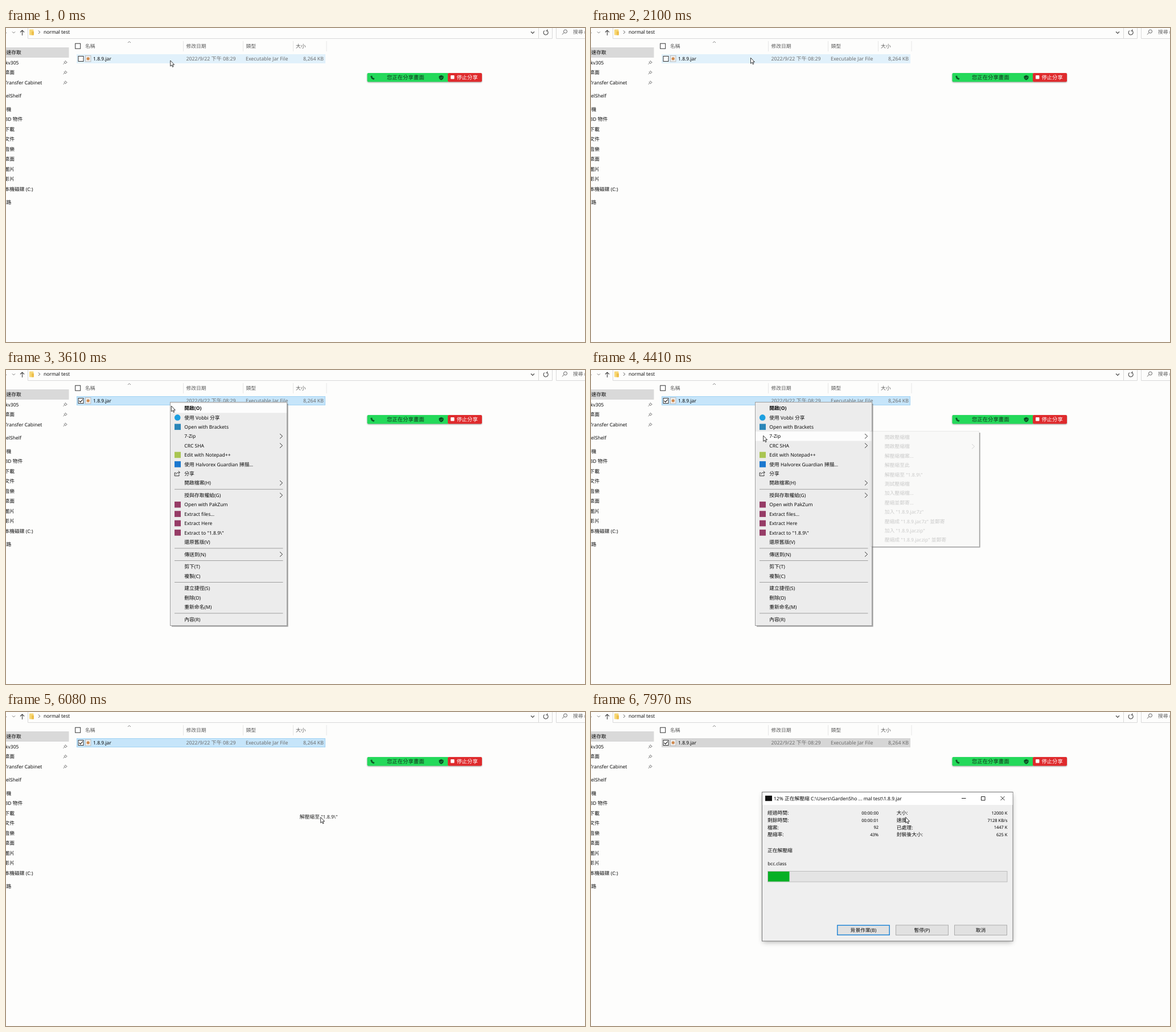
Recreate the animation shown at these times as an HTML page. Size 1017x551 px, loop 8000 ms.

```html
<!DOCTYPE html>
<html lang="zh-Hant">
<head>
<meta charset="utf-8">
<title>Extracting a jar</title>
<style>
html, body { margin: 0; width: 100%; height: 100%; overflow: hidden; background: #fdfdfc; }
svg { display: block; width: 1017px; height: 551px; }
text { font-family: "Noto Sans", "Noto Sans CJK TC", "Noto Sans CJK", sans-serif; text-rendering: geometricPrecision; white-space: pre; }
</style>
</head>
<body>
<svg id="stage" viewBox="0 0 1017 551"></svg>
<script>
const LOOP = 8000;
const CJK = /([\u3000-\u9fff]+)/;
const STEP = 16.4;

// Drawing helpers. y is the middle of the text line.
function text(x, y, s, { fill = '#0c0c0c', size = 8.5, anchor = 'start', weight = 400 } = {}) {
  const runs = s.split(CJK).map((part, i) =>
    i % 2 ? `<tspan font-size="${size * 1.035}">${part}</tspan>` : part).join('');
  return `<text x="${x}" y="${y + 3.1}" font-size="${size}" fill="${fill}" text-anchor="${anchor}" font-weight="${weight}">${runs}</text>`;
}
const rect = (x, y, w, h, fill, more = '') =>
  `<rect x="${x}" y="${y}" width="${w}" height="${h}" fill="${fill}" ${more}/>`;
const line = (d, color = '#444', width = 1, more = '') =>
  `<path d="${d}" fill="none" stroke="${color}" stroke-width="${width}" ${more}/>`;
const group = (id, body, more = '') => `<g id="${id}" ${more}>${body}</g>`;
const dot = (x, y, r, fill) => `<circle cx="${x}" cy="${y}" r="${r}" fill="${fill}"/>`;
const checkbox = (x, y) => rect(x, y, 9, 9, '#fff', 'stroke="#333"');

function toolbar() {
  return line('M38.5 0V18.5H959.5V0M935.5 0V18M1017 18.5H966.5V0', '#d9d9d9') +
    line('M11 6.5L13.5 9L16 6.5M0 8.5H1', '#777') +
    line('M28.5 13V4M25 7.5L28.5 4L32 7.5', '#444', 1.1) +
    rect(41, 2.5, 7.5, 10, '#f7d774', 'rx="1"') + rect(45, 6, 4, 6.5, '#edbf4c') +
    line('M57 4.5L59.7 7.3L57 10', '#555') +
    text(66, 7.2, 'normal test') +
    line('M922 6.5L925 9.5L928 6.5', '#444', 1.1) +
    line('M950.5 4.7A4 4 0 1 1 946 4.6M950.8 2.5V5H948', '#444', 1.1) +
    line('M980.3 8.2L976.8 11.5', '#666') +
    '<circle cx="982.5" cy="6" r="3" fill="none" stroke="#666"/>' +
    text(996, 7.2, '搜尋 normal test', { fill: '#666' });
}

function sidebar() {
  const items = [
    [0.5, 43, '速存取'], [-1, 60.5, 'kv305'], [-2.6, 78, '桌面'], [-2.5, 95.8, 'Transfer Cabinet'],
    [0, 119, 'elShelf'], [0.5, 142.5, '機'], [-1.5, 160, '3D 物件'], [-2.6, 177.5, '下載'],
    [-2.6, 195, '文件'], [-2.6, 212.5, '音樂'], [-2.6, 230, '桌面'], [-2.6, 247.5, '圖片'],
    [-2.6, 265, '影片'], [-2.6, 282.8, '本機磁碟 (C:)'], [0.5, 306, '路']
  ];
  const pins = [60.5, 78, 95.8].map(y =>
    line(`M104 ${y - 3.2}L107.4 ${y + .2}M104.8 ${y - 2.4}L102.4 ${y - .5}M106.7 ${y - .5}L104.7 ${y + 2}M101.6 ${y - 1}L105 ${y + 2.4}M103 ${y + .8}L100.7 ${y + 3.2}`, '#777')).join('');
  return rect(0, 34, 110.5, 18, '#d9d9d9') + items.map(i => text(...i)).join('') + pins;
}

function header() {
  const gray = { fill: '#5c5c5c' };
  return [311.5, 416.5, 504.5, 563].map(x => line(`M${x} 23V41`, '#e6e6e6')).join('') +
    checkbox(121.7, 27.2) +
    line('M214 26L216.5 23.6L219 26', '#777', .9) +
    text(139, 31.8, '名稱', gray) + text(316.5, 31.8, '修改日期', gray) +
    text(421.5, 31.8, '類型', gray) + text(509, 31.8, '大小', gray);
}

function fileRow() {
  const gray = { fill: '#6d6d6d', size: 8.8 };
  return rect(124.5, 46.5, 436, 15, 'none', 'id="rowBg"') +
    group('tickBox', checkbox(127, 49.5)) +
    line('M128.6 54L130.8 56.3L134.6 51.6', '#222', 1.1, 'id="tick"') +
    rect(139.5, 48.5, 9.5, 10.5, '#eee', 'stroke="#aaa" stroke-width=".7"') + dot(144.2, 53.8, 2.6, '#d08a4e') +
    text(153, 53.6, '1.8.9.jar') +
    text(316.5, 53.6, '2022/9/22 下午 08:29', gray) +
    text(421, 53.6, 'Executable Jar File', gray) +
    text(558, 53.6, '8,264 KB', { ...gray, anchor: 'end' });
}

function shareBar() {
  return `<g filter="url(#soft)" opacity=".6">${rect(634.5, 80, 201.5, 15.5, '#666', 'rx="2"')}</g>` +
    rect(634.5, 79, 143, 15.5, '#24d95a', 'rx="2"') + rect(776, 79, 60, 15.5, '#df2a2c', 'rx="2"') +
    `<path d="M640 84.5L643 83.5L644 87L647.5 88.5L646 91L642 89Z" fill="#0c5a26"/>` +
    `<path d="M764.5 82.8L768.5 84.5V87.5Q768 90 764.5 91.5Q761 90 760.5 87.5V84.5Z" fill="#0c4a22"/>` +
    line('M762.6 87L764.2 88.7L766.8 85.6', '#24d95a', .9) +
    text(669, 86.6, '您正在分享畫面', { size: 9.05, fill: '#10301a' }) +
    rect(781, 83, 6.5, 6.5, '#fff', 'rx="1"') +
    text(791.5, 86.4, '停止分享', { size: 9, fill: '#fff' });
}

// label, separator before, submenu arrow, icon
const MENU = [
  ['開啟(O)'], ['使用 Vobbi 分享', 0, 0, 'call'], ['Open with Brackets', 0, 0, '#2a86b8'], ['7-Zip', 0, 1],
  ['CRC SHA', 0, 1], ['Edit with Notepad++', 0, 0, '#a9c552'], ['使用 Halvorex Guardian 掃描...', 0, 0, '#1b78cf'],
  ['分享', 0, 0, 'share'], ['開啟檔案(H)', 0, 1], ['授與存取權給(G)', 1, 1],
  ['Open with PakZum', 0, 0, '#963c66'], ['Extract files...', 0, 0, '#963c66'], ['Extract Here', 0, 0, '#963c66'],
  ['Extract to "1.8.9\\"', 0, 0, '#963c66'], ['還原舊版(V)'], ['傳送到(N)', 1, 1], ['剪下(T)', 1], ['複製(C)'],
  ['建立捷徑(S)', 1], ['刪除(D)'], ['重新命名(M)'], ['內容(R)', 1]
];
let nextY = 67 - STEP;
const menuY = MENU.map(([, sep]) => nextY += STEP + (sep ? 5.2 : 0));

const SUB = ['開啟壓縮檔', '開啟壓縮檔', '解壓縮檔案...', '解壓縮至此', '解壓縮至 "1.8.9\\"', '測試壓縮檔',
  '加入壓縮檔...', '壓縮並郵寄...', '加入 "1.8.9.jar.7z"', '壓縮成 "1.8.9.jar.7z" 並郵寄',
  '加入 "1.8.9.jar.zip"', '壓縮成 "1.8.9.jar.zip" 並郵寄'];
const subY = SUB.map((_, i) => 117.8 + i * STEP);

function icon(kind, y) {
  if (!kind) return '';
  if (kind === 'call') return dot(301.2, y, 5.3, '#1c9fe0');
  if (kind === 'share')
    return line(`M298.5 ${y - 1.5}H296.2V${y + 4}H304V${y + 1.5}M298.5 ${y + 1.5}Q299 ${y - 2} 305 ${y - 2}M302.8 ${y - 4.5}L305.5 ${y - 2}L302.8 ${y + .5}`, '#333');
  return rect(296, y - 5.3, 11, 10.6, kind);
}
const arrow = (x, y) => line(`M${x} ${y - 4.2}L${x + 4.6} ${y}L${x} ${y + 4.2}`, '#333');

function panel(id, x, y, w, h, body) {
  const edge = line(`M${x + w + .8} ${y + 3}V${y + h + .8}H${x + 3}`, '#858585', 1.6, 'opacity=".75"');
  return group(id, edge + group(id + 'Body',
    rect(x + .5, y + .5, w - 1, h - 1, '#ececec', 'stroke="#a0a0a0"') +
    rect(x + 1, 0, w - 2, STEP, '#fdfdfd', `id="${id}Hot"`) + body));
}

function menu() {
  return panel('menu', 288, 56, 206, 393, MENU.map(([label, sep, sub, kind], i) => {
    const y = menuY[i];
    return (sep ? line(`M296 ${y - 10.5}H486.5`, '#979797', .9) : '') + icon(kind, y) +
      text(313.3, y, label, { weight: i ? 400 : 700 }) + (sub ? arrow(481, y) : '');
  }).join(''));
}

function submenu() {
  return panel('sub', 490, 107, 192, 203, SUB.map((label, i) =>
    group('sub' + i, text(515.8, subY[i], label) + (i === 1 ? arrow(669, subY[i]) : ''))).join(''));
}

function dialog(pct) {
  const started = pct > 0;
  const left = [['經過時間:', '00:00:00'], ['剩餘時間:', started ? '00:00:01' : ''], ['檔案:', started ? '92' : '0'], ['壓縮率:', started ? '43%' : '']];
  const right = [['大小:', started ? '12000 K' : ''], ['速度:', started ? '7128 KB/s' : ''], ['已處理:', started ? '1447 K' : '0'], ['封裝後大小:', started ? '625 K' : '0']];
  const table = (rows, x, end) => rows.map(([label, value], i) =>
    text(x, 176.8 + i * 12.8, label) +
    text(end, 176.6 + i * 12.8, value, { size: 7.5, anchor: 'end', fill: '#000', weight: 500 })).join('');
  const button = (x, label, main) =>
    (main ? rect(x + .8, 374.3, 91.4, 16.9, '#e1e1e1', 'stroke="#1780d4" stroke-width="1.4"')
      : rect(x + .5, 374, 92, 17.5, '#e1e1e1', 'stroke="#adadad"')) +
    text(x + 46.5, 382.7, label, { anchor: 'middle' });
  return `<g filter="url(#deep)" opacity=".3">${rect(302, 145, 438, 259, '#000')}</g>` +
    rect(300.5, 140.5, 440.5, 261.5, '#efefef', 'stroke="#777"') +
    rect(301, 141, 439.5, 22, '#fff') + rect(306, 146.8, 12, 9.4, '#111') +
    text(321, 151.6, pct + '% 正在解壓縮 C:\\Users\\GardenSho ... mal test\\1.8.9.jar') +
    line('M651 151.5H658.5M685.5 148.5H692V155H685.5ZM719.5 148L726.5 155M726.5 148L719.5 155', '#222') +
    table(left, 310, 505) + table(right, 536.8, 731.5) +
    text(310, 242.4, '正在解壓縮') + (started ? text(310.3, 265.6, 'bcc.class', { size: 8.1 }) : '') +
    rect(310.5, 279.5, 420.5, 18.5, '#e4e4e4', 'stroke="#bcbcbc"') +
    rect(311, 280, pct * 3.125, 17.5, '#07b025') +
    button(432, '背景作業(B)', true) + button(535, '暫停(P)') + button(638, '取消');
}

const stage = document.getElementById('stage');
stage.innerHTML = `<defs>
  <filter id="soft" x="-5%" y="-50%" width="110%" height="200%"><feGaussianBlur stdDeviation="1.2"/></filter>
  <filter id="deep" x="-10%" y="-10%" width="120%" height="120%"><feGaussianBlur stdDeviation="5"/></filter>
  </defs>` +
  rect(0, 0, 1017, 551, '#fdfdfc') + toolbar() + sidebar() + header() + fileRow() + shareBar() +
  menu() + submenu() +
  group('chosen', text(515.8, subY[4], SUB[4])) +
  group('dialog', '') +
  group('cursor',
    '<path d="M0 0V10L2.3 7.9L3.8 11.4L5.4 10.7L3.9 7.3H6.9Z" fill="#fff" stroke="#222" stroke-width=".9"/>' +
    group('busy', dot(8.3, 0, 4.6, '#1b7fcb') + dot(8.3, 0, 2, '#e8f6ff') +
      line('M8.3 -3.3A3.3 3.3 0 0 1 11.6 0', '#8fd4ff', 1.6, 'id="spin"')));

const el = {};
stage.querySelectorAll('[id]').forEach(n => el[n.id] = n);

// Cursor path: time, x, y
const PATH = [
  [0, 288.7, 57], [290, 288.7, 57], [500, 292, 64], [800, 283, 58], [1430, 283, 58], [1470, 291.5, 62.3],
  [1670, 291.5, 62.3], [1680, 290.7, 62.3], [1850, 290.7, 62.3], [2100, 280.5, 52.3], [2480, 280.5, 52.3],
  [2570, 286, 59.5], [2640, 288.7, 55.8], [3500, 288.7, 55.8], [4010, 302.7, 115.2], [4580, 302.7, 115.2],
  [5080, 490.9, 133.5], [5710, 541, 183.5], [5750, 541, 183.5], [5830, 552.7, 184.6], [LOOP, 552.7, 184.6]
];
function cursorAt(t) {
  const i = PATH.findIndex(p => p[0] > t);
  const [t0, x0, y0] = PATH[i - 1], [t1, x1, y1] = PATH[i];
  const k = (t - t0) / (t1 - t0), e = k * k * (3 - 2 * k);
  return [x0 + (x1 - x0) * e, y0 + (y1 - y0) * e];
}

const ramp = (t, t0, t1, from = 0, to = 1) =>
  from + (to - from) * Math.min(1, Math.max(0, (t - t0) / (t1 - t0)));
const show = (node, on) => node.setAttribute('visibility', on ? 'visible' : 'hidden');
const fade = (node, value) => node.setAttribute('opacity', value);
const rowUnder = (ys, y) => ys.findIndex(c => Math.abs(c - y) <= STEP / 2);

function highlight(bar, ys, index, on) {
  show(bar, on && index >= 0);
  if (index >= 0) bar.setAttribute('y', ys[index] - STEP / 2);
}

const OPEN = 3230, SUB_OPEN = 4370, PICK = 6040, FADE = 7260, DIALOG = 7600;
let shownPct = -1;

function render(t) {
  const [x, y] = cursorAt(t);
  const selected = t >= 2520, inactive = t >= DIALOG;
  const hover = y < 63;
  el.rowBg.setAttribute('fill', inactive ? '#d6d6d6' : selected ? '#c6e5fa' : hover ? '#e1f1fb' : 'none');
  el.rowBg.setAttribute('stroke', inactive ? '#d6d6d6' : selected ? '#a2d3f4' : hover ? '#e1f1fb' : 'none');
  show(el.tickBox, selected || hover);
  show(el.tick, selected);

  const menuOn = t >= OPEN && t < PICK, subOn = t >= SUB_OPEN && t < PICK;
  const inSub = subOn && x > 490.8;
  show(el.menu, menuOn);
  fade(el.menuBody, ramp(t, OPEN, OPEN + 160, .4));
  highlight(el.menuHot, menuY, inSub ? 3 : rowUnder(menuY, y), menuOn && y > 59);
  show(el.sub, subOn);
  fade(el.subBody, ramp(t, SUB_OPEN, SUB_OPEN + 200));
  highlight(el.subHot, subY, rowUnder(subY, y), inSub);
  fade(el.sub1, t >= 5080 && t < 5120 ? 0 : 1);

  show(el.chosen, t >= PICK && t < FADE + 160);
  fade(el.chosen, t < FADE ? .9 : ramp(t, FADE, FADE + 160, .75, 0));

  show(el.dialog, inactive);
  fade(el.dialog, ramp(t, DIALOG, DIALOG + 120, .3));
  const pct = t < 7890 ? 0 : 12;
  if (pct !== shownPct) el.dialog.innerHTML = dialog(shownPct = pct);

  el.cursor.setAttribute('transform', `translate(${x} ${y})`);
  show(el.busy, t >= FADE && t < DIALOG);
  el.spin.setAttribute('transform', `rotate(${(t - FADE) * .4} 8.3 0)`);
}

const start = performance.now();
function tick() {
  render((performance.now() - start) % LOOP);
  requestAnimationFrame(tick);
}
tick();
</script>
</body>
</html>
```
